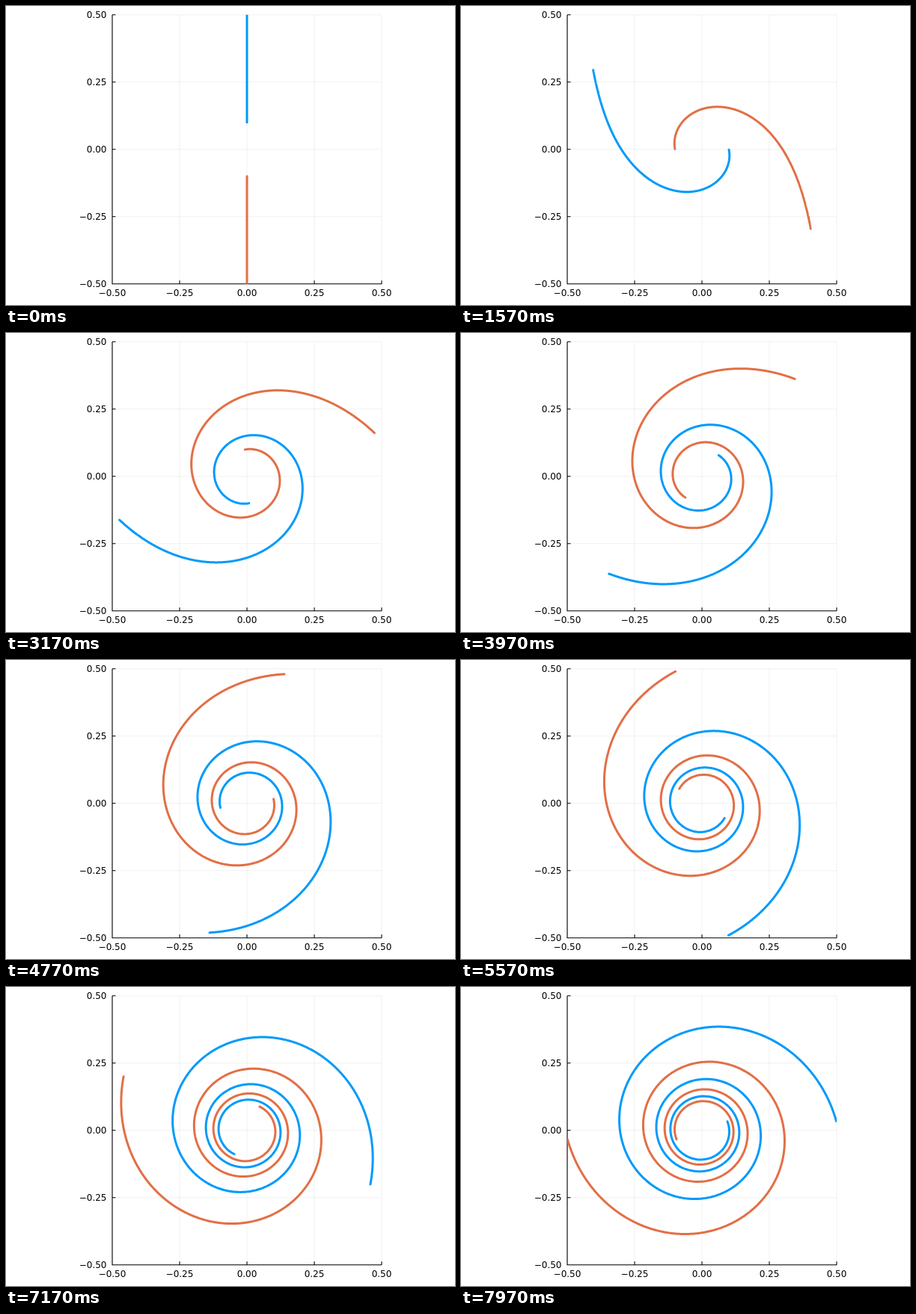
These frames come from a looping animation (600 px wide and 400 px high, 8 s). An HTML page:

```html
<!DOCTYPE html>
<html lang="en">
<head>
<meta charset="utf-8">
<title>Winding spiral</title>
<style>
  html, body { margin: 0; width: 100%; height: 100%; overflow: hidden; background: #fff; }
  svg { display: block; }
  text { font: 12px "DejaVu Sans", sans-serif; fill: #000; }
  .grid { stroke: #000; stroke-opacity: .1; stroke-width: .6; }
  .axis { stroke: #000; stroke-width: 1.1; fill: none; }
  .arm { fill: none; stroke-width: 3; stroke-linecap: round; stroke-linejoin: round; }
</style>
</head>
<body>
<svg width="600" height="400" viewBox="0 0 600 400">
  <clipPath id="plot"><rect x="142" y="11.8" width="360" height="360"/></clipPath>
  <g id="frame"></g>
  <g clip-path="url(#plot)">
    <path class="arm" id="blue" stroke="#009afa"/>
    <path class="arm" id="orange" stroke="#e26f46"/>
  </g>
</svg>
<script>
const LEFT = 142, TOP = 11.8, SIZE = 360;
const RIGHT = LEFT + SIZE, BOTTOM = TOP + SIZE;
const LOOP = 8000, FPS = 30, SPEED = 0.01;
const R_MIN = 0.1, R_MAX = 0.5, SEGMENTS = 800;

const px = x => LEFT + (x + 0.5) * SIZE;
const py = y => TOP + (0.5 - y) * SIZE;

function drawFrame() {
  let grid = '', axis = `M${LEFT} ${TOP}V${BOTTOM}H${RIGHT}`, labels = '';
  for (const v of [-0.5, -0.25, 0, 0.25, 0.5]) {
    const x = px(v), y = py(v);
    const label = v.toFixed(2).replace('-', '\u2212');
    grid += `M${x} ${TOP}V${BOTTOM}M${LEFT} ${y}H${RIGHT}`;
    axis += `M${x} ${BOTTOM}v-4.5M${LEFT} ${y}h4.5`;
    labels += `<text x="${x}" y="387.5" text-anchor="middle">${label}</text>` +
              `<text x="134.5" y="${y + 4.4}" text-anchor="end">${label}</text>`;
  }
  document.getElementById('frame').innerHTML =
    `<path class="grid" d="${grid}"/><path class="axis" d="${axis}"/>${labels}`;
}

// Every point moves at the same linear speed, so inner radii turn faster.
function armPath(step, side) {
  const points = [];
  for (let i = 0; i <= SEGMENTS; i++) {
    const r = R_MIN + (R_MAX - R_MIN) * i / SEGMENTS;
    const angle = Math.PI / 2 + SPEED * step / r;
    points.push(px(side * r * Math.cos(angle)).toFixed(2) + ' ' +
                py(side * r * Math.sin(angle)).toFixed(2));
  }
  return 'M' + points.join('L');
}

function render(now) {
  // Steps start on 10 ms ticks: 0, 30, 70, 100, ...
  const tick = Math.floor((now % LOOP) / 10) * 10;
  const step = Math.floor((tick + 3.4) * FPS / 1000) % (LOOP * FPS / 1000);
  document.getElementById('blue').setAttribute('d', armPath(step, 1));
  document.getElementById('orange').setAttribute('d', armPath(step, -1));
}

function loop() {
  render(performance.now());
  requestAnimationFrame(loop);
}

drawFrame();
loop();
</script>
</body>
</html>
```
